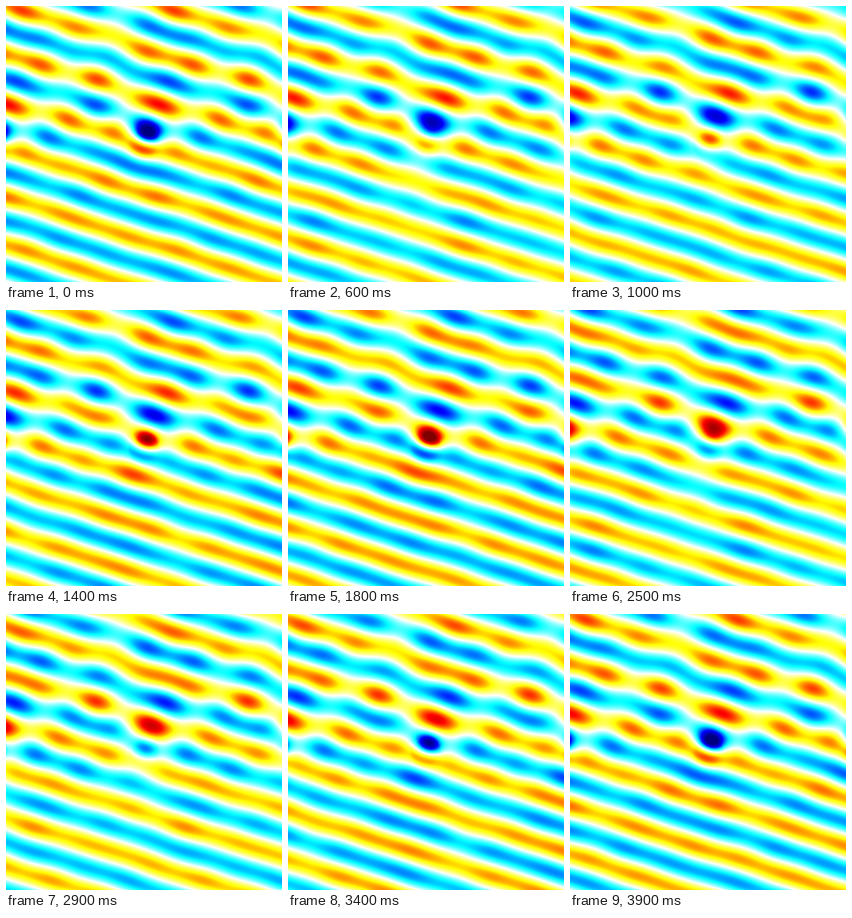
These frames come from a looping animation (360 by 360 pixels, 4 s). A matplotlib script:

```python
import numpy as np
import matplotlib.pyplot as plt
from matplotlib.animation import FuncAnimation
from matplotlib.colors import LinearSegmentedColormap
from numpy.polynomial.legendre import legval

# A plane wave travels up through a row of dielectric spheres (lengths in px).
SIZE = 360
FRAMES = 40
WAVELENGTH = 60
PERIOD = 198
RADIUS = 20
INDEX = 1.5
NEIGHBOURS = 12
MAX_ORDER = 7
FULL_SCALE = 2.3

k = 2 * np.pi / WAVELENGTH
sin_t = WAVELENGTH / PERIOD
cos_t = np.sqrt(1 - sin_t**2)


def bessel(order, z):
    """Spherical Bessel function from its power series."""
    term = z**order / np.prod(np.arange(1.0, 2 * order + 2, 2))
    total = term
    for s in range(1, 16):
        term = -term * z**2 / (2 * s * (2 * order + 2 * s + 1))
        total = total + term
    return total


def hankel(z):
    """Outgoing spherical Hankel functions up to MAX_ORDER + 1."""
    wave = np.exp(1j * z) / z
    h = [-1j * wave, -wave * (1 + 1j / z)]
    for n in range(1, MAX_ORDER + 1):
        h.append((2 * n + 1) / z * h[n] - h[n - 1])
    return h


def coefficients():
    """Inner and scattered amplitudes of every partial wave."""
    x, z = k * RADIUS, INDEX * k * RADIUS
    h = hankel(x)
    inner, outer = [], []
    for n in range(MAX_ORDER + 1):
        jz = bessel(n, z)
        dj = n / z * jz - bessel(n + 1, z)
        dh = n / x * h[n] - h[n + 1]
        c = 1j / x**2 / (jz * dh - INDEX * dj * h[n])
        inner.append(c)
        outer.append((c * jz - bessel(n, x)) / h[n])
    return inner, outer


def partial_waves(radial, amplitudes, cosine):
    weights = [(2 * n + 1) * 1j**n * a for n, a in enumerate(amplitudes)]
    return sum(w * f * legval(cosine, np.eye(n + 1)[n])
               for n, (w, f) in enumerate(zip(weights, radial)))


def total_field():
    axis = np.arange(SIZE) - (SIZE - 1) / 2
    x, y = np.meshgrid(axis, -axis)
    inner, outer = coefficients()
    field = np.exp(1j * k * (sin_t * x + cos_t * y))
    for m in range(-NEIGHBOURS, NEIGHBOURS + 1):
        dx = x - m * PERIOD
        r = np.hypot(dx, y)
        cosine = (sin_t * dx + cos_t * y) / r
        radial = hankel(k * np.maximum(r, RADIUS))
        field += partial_waves(radial, outer, cosine) * (r > RADIUS)
        inside = r <= RADIUS
        radial = [bessel(n, INDEX * k * r[inside])
                  for n in range(MAX_ORDER + 1)]
        field[inside] = partial_waves(radial, inner, cosine[inside])
    return field


field = total_field() / FULL_SCALE

cmap = LinearSegmentedColormap.from_list(
    "wave",
    [(0, 0, 0.5), (0, 0, 1), (0, 1, 1), (1, 1, 1),
     (1, 1, 0), (1, 0, 0), (0.5, 0, 0)],
    N=1024,
)


def snapshot(frame):
    return (field * np.exp(-2j * np.pi * frame / FRAMES)).real


fig = plt.figure(figsize=(3.6, 3.6), dpi=100)
ax = fig.add_axes([0, 0, 1, 1])
ax.axis("off")
image = ax.imshow(snapshot(0), cmap=cmap, vmin=-1, vmax=1,
                  interpolation="nearest", aspect="auto")


def update(frame):
    image.set_data(snapshot(frame))
    return [image]


anim = FuncAnimation(fig, update, frames=FRAMES, interval=100,
                     repeat=True, repeat_delay=0, blit=False)
plt.show()
```
